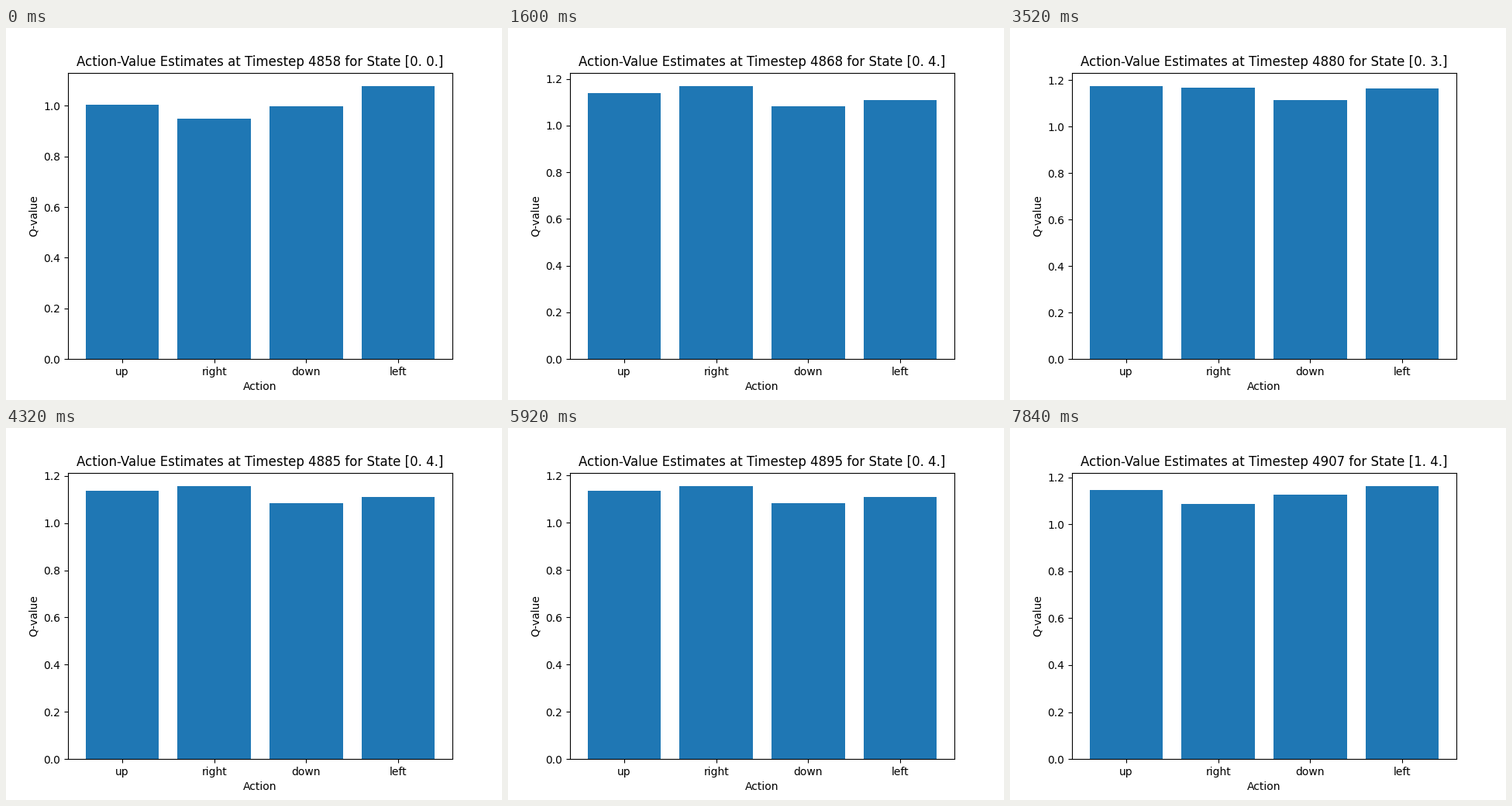
Write a matplotlib script that moves like this. It is 640 by 480 pixels and loops after 8000 ms.

```python
import numpy as np
import matplotlib.pyplot as plt
from matplotlib.animation import FuncAnimation

FRAMES, INTERVAL = 50, 160
FIRST_STEP = 4858
ACTIONS = ["up", "right", "down", "left"]

# (step at which the agent enters, grid cell)
PATH = [
    (0, (0, 0)), (3, (0, 1)), (5, (0, 2)), (6, (0, 3)), (8, (0, 4)),
    (13, (0, 3)), (26, (0, 4)), (29, (0, 3)), (36, (0, 4)),
    (38, (1, 4)), (41, (1, 3)), (44, (1, 4)),
]

# Per cell: step -> Q-values for up, right, down, left
Q = {
    (0, 0): {0: (1.004, 0.949, 0.998, 1.077), 2: (1.004, 0.949, 0.998, 1.052)},
    (0, 1): {3: (1.060, 1.110, 1.040, 1.090), 4: (1.060, 1.102, 1.040, 1.090)},
    (0, 2): {5: (1.120, 1.160, 1.090, 1.130)},
    (0, 3): {6: (1.172, 1.215, 1.125, 1.175), 17: (1.167, 1.204, 1.119, 1.170),
             22: (1.174, 1.168, 1.115, 1.165), 31: (1.153, 1.1727, 1.140, 1.157)},
    (0, 4): {8: (1.145, 1.180, 1.085, 1.115), 10: (1.139, 1.168, 1.082, 1.109),
             28: (1.135, 1.155, 1.085, 1.110)},
    (1, 3): {41: (1.184, 0.9185, 0.989, 1.1565), 42: (1.179, 0.9185, 0.989, 1.1565),
             43: (1.172, 0.9185, 0.989, 1.1565)},
    (1, 4): {38: (1.150, 1.090, 1.130, 1.205), 44: (1.148, 1.088, 1.128, 1.192),
             49: (1.1455, 1.086, 1.1255, 1.1615)},
}


def cell_at(i):
    return [cell for start, cell in PATH if start <= i][-1]


def q_values(cell, i):
    steps = list(Q[cell])
    columns = zip(*Q[cell].values())
    return [np.interp(i, steps, col) for col in columns]


fig, ax = plt.subplots(figsize=(6.4, 4.8), dpi=100)


def draw(i):
    cell = cell_at(i)
    ax.clear()
    ax.bar(ACTIONS, q_values(cell, i), color="#1f77b4")
    ax.set_xlabel("Action")
    ax.set_ylabel("Q-value")
    ax.set_title(f"Action-Value Estimates at Timestep {FIRST_STEP + i} "
                 f"for State [{cell[0]}. {cell[1]}.]")


anim = FuncAnimation(fig, draw, frames=FRAMES, init_func=lambda: draw(0),
                     interval=INTERVAL, repeat=True)
plt.show()
```
